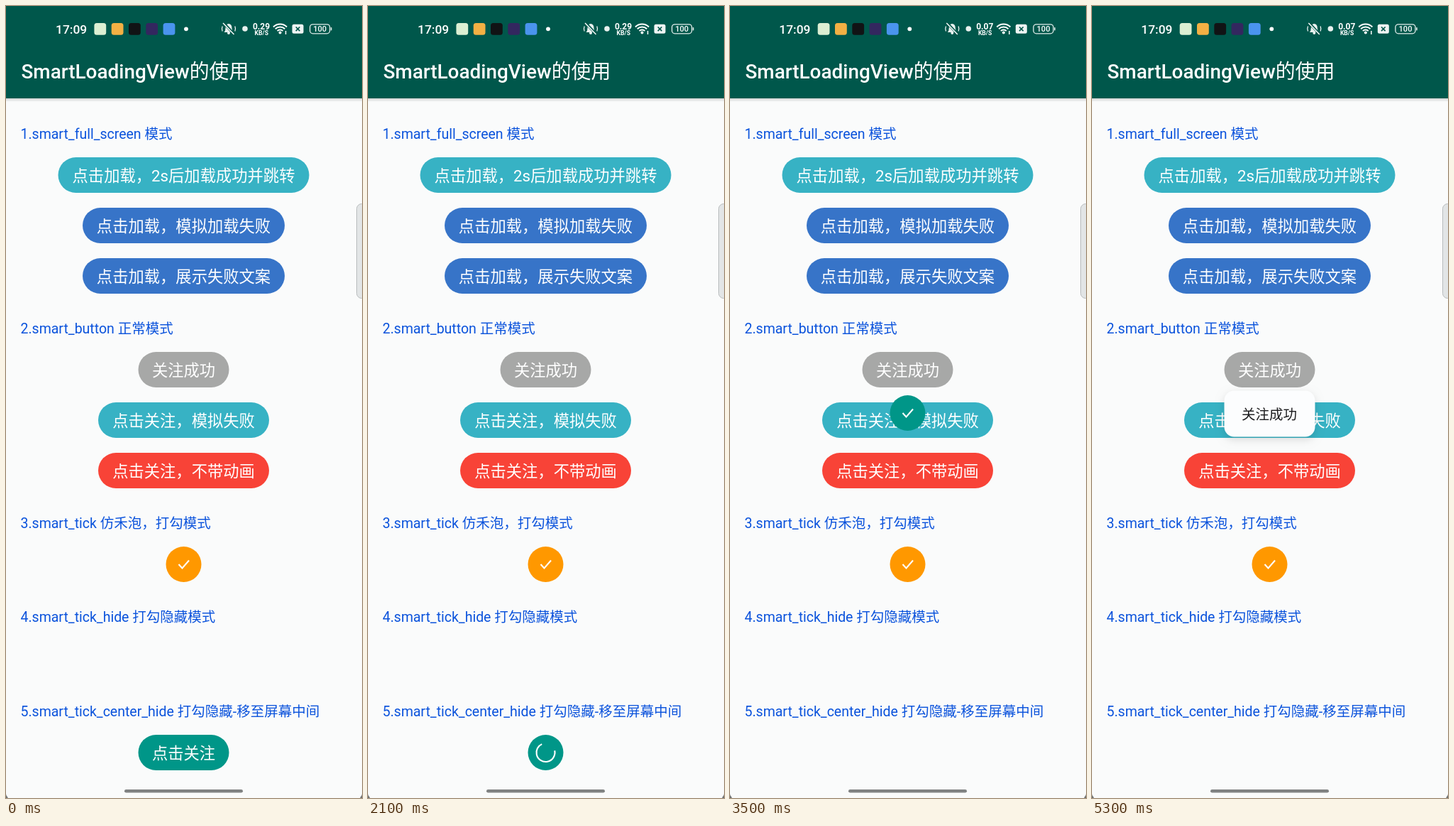
Write an HTML page with a canvas that moves like this. It is 502 px wide and 1115 px high and loops after 5.4 s.

```html
<!DOCTYPE html>
<html lang="zh-CN">
<head>
<meta charset="utf-8">
<title>SmartLoadingView</title>
<style>
  html, body { margin: 0; width: 100%; height: 100%; overflow: hidden; background: #fafbfb; }
  canvas { display: block; }
</style>
</head>
<body>
<canvas id="stage" width="502" height="1115"></canvas>
<script>
const ctx = document.getElementById('stage').getContext('2d');
const W = 502, H = 1115, CX = 250.5;
const LOOP = 5400, STEP = 100;
const FONT = 'Roboto, "Noto Sans CJK SC", "Noto Sans CJK", sans-serif';
const TEAL = '#37b2c4', BLUE = '#3774c8', GREEN = '#009688';

const labels = [
  ['1.smart_full_screen 模式', 187],
  ['2.smart_button 正常模式', 461],
  ['3.smart_tick 仿禾泡，打勾模式', 735],
  ['4.smart_tick_hide 打勾隐藏模式', 867],
  ['5.smart_tick_center_hide 打勾隐藏-移至屏幕中间', 1000]
];

// text, centre y, width, colour
const buttons = [
  ['点击加载，2s后加载成功并跳转', 238, 354, TEAL],
  ['点击加载，模拟加载失败', 309, 285, BLUE],
  ['点击加载，展示失败文案', 380, 285, BLUE],
  ['关注成功', 512, 128, '#a7a8a7'],
  ['点击关注，模拟失败', 583, 241, TEAL],
  ['点击关注，不带动画', 654, 241, '#f84337']
];

const span = (t, start, length) => Math.min(1, Math.max(0, (t - start) / length));
const ease = p => (1 - Math.cos(p * Math.PI)) / 2;

function text(s, x, y, size, color, align = 'left', weight = 400) {
  ctx.font = `${weight} ${size}px ${FONT}`;
  ctx.textAlign = align;
  ctx.fillStyle = color;
  ctx.fillText(s, x, y);
}

function box(x, y, w, h, r, fill, stroke, line = 1) {
  ctx.beginPath();
  ctx.roundRect(x, y, w, h, r);
  if (fill) { ctx.fillStyle = fill; ctx.fill(); }
  if (stroke) { ctx.strokeStyle = stroke; ctx.lineWidth = line; ctx.stroke(); }
}

function dot(x, y, r, color) {
  ctx.beginPath();
  ctx.arc(x, y, r, 0, Math.PI * 2);
  ctx.fillStyle = color;
  ctx.fill();
}

function arc(x, y, r, from, sweep, width) {
  const a = from * Math.PI / 180;
  ctx.beginPath();
  ctx.arc(x, y, r, a, a + sweep * Math.PI / 180);
  ctx.strokeStyle = '#fff';
  ctx.lineWidth = width;
  ctx.stroke();
}

function line(points, color, width) {
  ctx.beginPath();
  points.forEach(([x, y]) => ctx.lineTo(x, y));
  ctx.strokeStyle = color;
  ctx.lineWidth = width;
  ctx.stroke();
}

function tick(x, y, p = 1) {
  const length = 22;
  ctx.save();
  ctx.setLineDash([length * p, length * 2]);
  if (p > 0) line([[x - 7, y], [x - 2, y + 5.5], [x + 8, y - 6]], '#fff', 2.1);
  ctx.restore();
}

function pill(s, y, w, color, alpha = 1) {
  box(CX - w / 2, y - 25, w, 50, 25, color);
  if (alpha <= 0) return;
  ctx.save();
  ctx.globalAlpha *= alpha;
  text(s, CX, y + 9, 22.3, '#fff', 'center');
  ctx.restore();
}

function bell(x, y) {
  ctx.beginPath();
  ctx.moveTo(x - 6.5, y + 5);
  ctx.quadraticCurveTo(x - 4.5, y + 3, x - 4.5, y - 1);
  ctx.quadraticCurveTo(x - 4.5, y - 6.5, x, y - 7);
  ctx.quadraticCurveTo(x + 4.5, y - 6.5, x + 4.5, y - 1);
  ctx.quadraticCurveTo(x + 4.5, y + 3, x + 6.5, y + 5);
  ctx.closePath();
  ctx.fillStyle = '#e9f1ef';
  ctx.fill();
  dot(x, y + 6, 2, '#e9f1ef');
  line([[x - 7, y - 8], [x + 8, y + 8]], '#00574b', 3.4);
  line([[x - 8, y - 8], [x + 7.5, y + 8]], '#fff', 1.4);
  for (const side of [0, 180]) arc(x, y, 9.5, side - 22, 44, 1.2);
}

function wifi(x, y) {
  for (const r of [5.5, 9.5, 13.5]) arc(x, y, r, -135, 90, 2);
  dot(x, y - 1.5, 2, '#fff');
}

function statusBar(t) {
  ctx.save();
  if (t >= 3500) ctx.translate(-0.7, 0);
  text('17:09', 70, 38.5, 17.4, '#fff', 'left', 500);
  ['#dcefd3', '#f3b044', '#111315', '#33275f', '#4a94ee'].forEach((color, i) =>
    box(124.4 + i * 24.3, 24, 16.8, 16.8, 3.5, color));
  dot(254, 32.3, 2.9, '#fff');
  bell(314, 32);
  dot(337, 32, 3.8, '#e9f1ef');
  text(t < 2900 ? '0.29' : '0.07', 360, 32.5, 12, '#fff', 'center', 700);
  text('KB/S', 360.3, 41, 8.6, '#fff', 'center', 700);
  wifi(386.5, 39);
  line([[394.5, 35], [394.5, 40]], '#fff', 1.5);
  box(403.5, 25.8, 16, 13, 2.5, '#eef4f3');
  line([[408.7, 29.5], [414.3, 35.1]], '#00574b', 1.7);
  line([[414.3, 29.5], [408.7, 35.1]], '#00574b', 1.7);
  box(428.6, 25.8, 28, 13, 4, null, '#e4eeec', 1.3);
  box(457.8, 30, 1.6, 4.6, 0.8, '#e4eeec');
  text('100', 442.7, 36.4, 11, '#fff', 'center', 500);
  ctx.restore();
}

function header(t) {
  const shade = ctx.createLinearGradient(0, 130, 0, 135);
  shade.addColorStop(0, 'rgba(0,0,0,.16)');
  shade.addColorStop(1, 'rgba(0,0,0,0)');
  ctx.fillStyle = shade;
  ctx.fillRect(0, 130, W, 5);
  ctx.fillStyle = '#00574b';
  ctx.fillRect(0, 0, W, 130);
  statusBar(t);
  text('SmartLoadingView的使用', 21.5, 102, 27.9, '#fff', 'left', 500);
}

// Shrink, spin, tick, rise to the middle, fade
function follow(t) {
  const fade = ease(span(t, 3500, 500));
  if (fade >= 1) return;
  const shrink = ease(span(t, 1000, 500));
  const y = 1051 - 478 * ease(span(t, 2800, 500));
  ctx.save();
  ctx.globalAlpha = 1 - fade;
  pill('点击关注', y, 128 - 78 * shrink, GREEN, 1 - 2 * shrink);
  if (t >= 2300) {
    tick(CX, y, span(t, 2300, 500));
  } else if (t >= 1500) {
    const n = 4 + (t - 1500) * 0.09;
    arc(CX, y, 13, n * 6, Math.min(30 + 6 * n, 374 - 2 * n), 2.1);
  }
  ctx.restore();
}

function toast(t) {
  const alpha = span(t, 4100, 300);
  if (!alpha) return;
  ctx.save();
  ctx.globalAlpha = alpha;
  ctx.shadowColor = 'rgba(0,0,0,.13)';
  ctx.shadowBlur = 12;
  ctx.shadowOffsetY = 4;
  box(186.5, 541.5, 128, 65, 14, '#fcfdfe');
  ctx.shadowColor = 'transparent';
  text('关注成功', CX - 0.5, 582, 19.5, '#1c1c1e', 'center');
  ctx.restore();
}

function edges() {
  box(494.5, 278.5, 20, 133, 7, '#e2e5e6', '#b9bdbe');
  box(167, 1103, 167, 4.6, 2.3, '#808282');
  ctx.beginPath();
  ctx.rect(0, H - 6, W, 6);
  ctx.roundRect(0, H - 30, W, 30, [0, 0, 6, 6]);
  ctx.save();
  ctx.clip('evenodd');
  ctx.fillStyle = '#6d7070';
  ctx.fillRect(0, H - 6, 2.5, 6);
  ctx.fillRect(W - 2.5, H - 6, 2.5, 6);
  ctx.restore();
}

function draw(t) {
  ctx.fillStyle = '#fafbfb';
  ctx.fillRect(0, 0, W, H);
  header(t);
  labels.forEach(([s, y]) => text(s, 20.5, y, 19.5, '#0b53dc'));
  buttons.forEach(b => pill(...b));
  dot(CX, 786, 25, '#ff9800');
  tick(CX, 786);
  follow(t);
  toast(t);
  edges();
}

let begin;
function loop(now) {
  begin ??= now;
  const t = (now - begin) % LOOP;
  draw(Math.floor((t + 2) / STEP) * STEP % LOOP);
  requestAnimationFrame(loop);
}
ctx.lineCap = 'butt';
ctx.lineJoin = 'miter';
requestAnimationFrame(loop);
</script>
</body>
</html>
```
